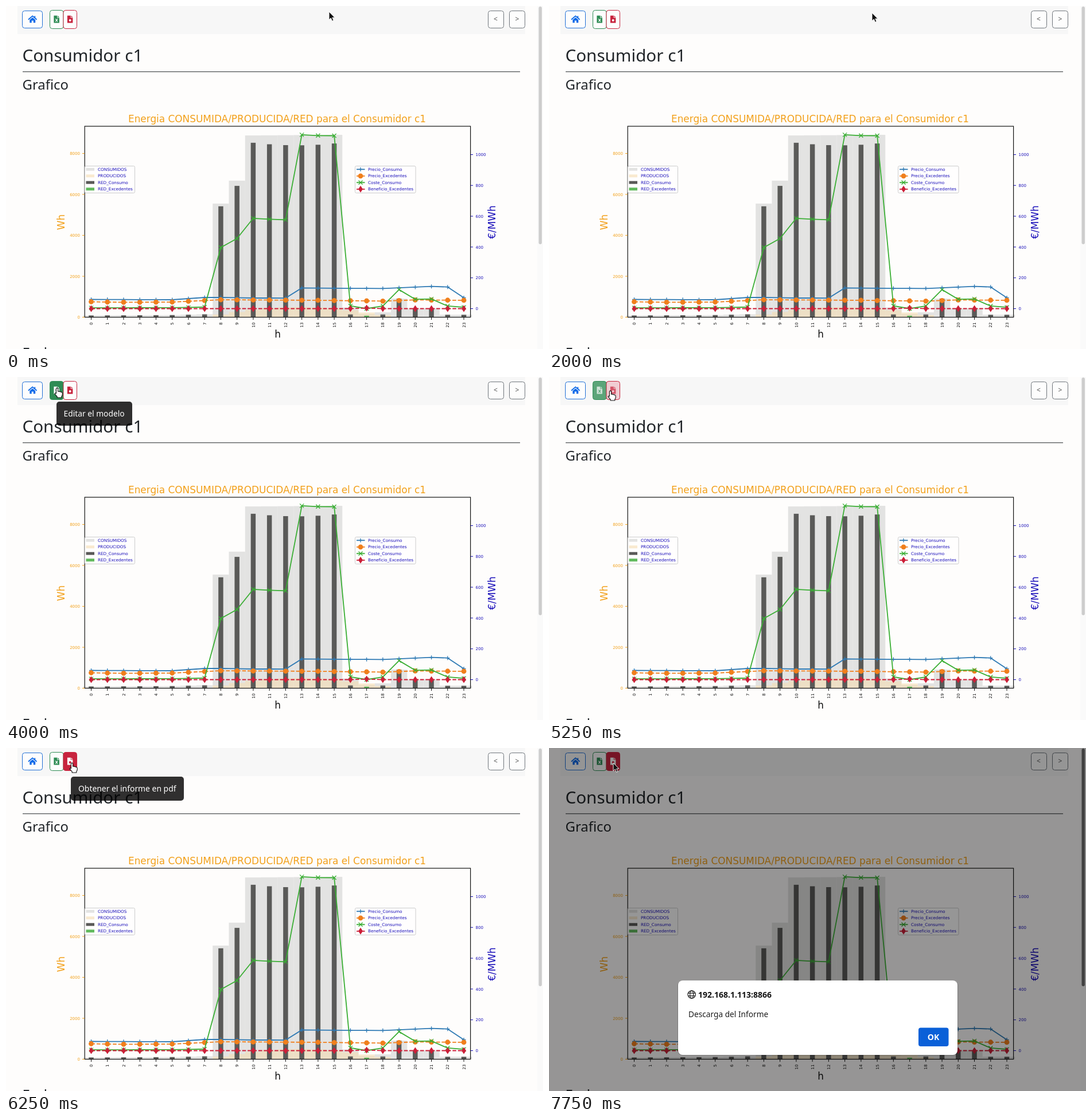
Animation, 936 px wide and 599 px high, one loop 8 s. Source, as an HTML page:

```html
<!DOCTYPE html>
<html lang="es">
<head>
<meta charset="utf-8">
<style>
html, body { margin: 0; width: 100%; height: 100%; overflow: hidden; background: #fefdfc; }
svg { display: block; width: 936px; height: 599px; font-family: "Noto Sans", "Open Sans", sans-serif; }
#chart { font-family: "DejaVu Sans", sans-serif; }
</style>
</head>
<body>
<svg viewBox="0 0 936 599">
  <rect width="936" height="599" fill="#fefdfc"/>
  <rect x="20" width="885" height="49" fill="#f7f7f7"/>
  <rect x="926" width="10" height="599" fill="#fafafa"/>
  <rect id="thumb" x="928.5" y="1" width="5.5" height="415" rx="2.7"/>

  <g fill="#fdfdfd" stroke="#6f757b">
    <rect x="840.5" y="8.5" width="27" height="30" rx="4"/>
    <rect x="877.5" y="8.5" width="27" height="30" rx="4"/>
    <rect x="28.5" y="8.5" width="35" height="30" rx="4" stroke="#1f6fd6"/>
  </g>
  <g font-size="12" fill="#555" text-anchor="middle">
    <text x="853.5" y="27">&lt;</text><text x="891" y="27">&gt;</text>
  </g>
  <path d="M39.5 23.3L46.2 17.4 53 23.3" fill="none" stroke="#0d6ae8" stroke-width="1.8" stroke-linejoin="round" stroke-linecap="round"/>
  <path d="M41.3 24.2L46.2 19.9 51.2 24.2V29.2H47.8V25.6H44.7V29.2H41.3ZM49.3 17.5H51.2V21L49.3 19.4Z" fill="#0d6ae8"/>
  <g id="buttons"></g>

  <g fill="#212529">
    <text x="28.5" y="97" font-size="29.6">Consumidor c1</text>
    <text x="28.5" y="145.5" font-size="23.9">Grafico</text>
    <text x="28.5" y="614" font-size="23.9">Fechas</text>
    <rect x="29" y="114.3" width="867" height="1"/>
  </g>

  <g id="chart"></g>

  <g id="tip1">
    <rect x="88" y="43" width="132" height="42" rx="5" opacity=".81"/>
    <text x="100.5" y="69" font-size="13.8" fill="#fff">Editar el modelo</text>
  </g>
  <g id="tip2">
    <rect x="113" y="50" width="197" height="42" rx="5" opacity=".81"/>
    <text x="126" y="76" font-size="13.9" fill="#fff">Obtener el informe en pdf</text>
  </g>

  <g id="dialog">
    <rect width="936" height="599" opacity=".41"/>
    <rect x="224" y="406" width="489" height="131" rx="9" opacity=".2"/>
    <rect x="225" y="406" width="487" height="130" rx="8" fill="#fff"/>
    <g fill="none" stroke="#1c1c1c" stroke-width="1.2">
      <circle cx="248.7" cy="430.5" r="6.7"/>
      <ellipse cx="248.7" cy="430.5" rx="3" ry="6.7"/>
      <path d="M242.5 428.2H255M242.5 432.8H255"/>
    </g>
    <text x="260" y="435.7" font-size="14" font-weight="700" fill="#111">192.168.1.113:8866</text>
    <text x="243" y="469.8" font-size="13.7" fill="#1c1c1c">Descarga del Informe</text>
    <rect x="644" y="488.5" width="52.5" height="32.5" rx="4" fill="#0a60d8"/>
    <text x="670" y="510" font-size="14" font-weight="700" fill="#fff" text-anchor="middle">OK</text>
  </g>

  <path id="arrow" d="M0 0V14L3.3 11 5.5 16.2 7.9 15.2 5.8 10.2H10Z" fill="#111" stroke="#fff" stroke-width=".9"/>
  <path id="hand" d="M-1.6 1.2Q0 -1 1.6 1.2V6.2Q3.3 5.2 4.4 6.8 6 6 6.9 7.5 8.8 7 9.2 9V12.5L7.8 15V17H.2V15.3L-4 10.4Q-3.8 8.5-1.6 9.8Z" fill="#fff" stroke="#111" stroke-width="1.1" stroke-linejoin="round"/>
</svg>
<script>
const el = id => document.getElementById(id);
const tag = (name, attrs, body = "") =>
  `<${name} ${Object.entries(attrs).map(([k, v]) => `${k}="${v}"`).join(" ")}>${body}</${name}>`;
const text = (x, y, s, size, fill, more = {}) => tag("text", { x, y, "font-size": size, fill, ...more }, s);
const turned = (x, y, s, size, fill, anchor) =>
  text(0, 0, s, size, fill, { "text-anchor": anchor, transform: `translate(${x} ${y}) rotate(-90)` });
const rect = (x, y, width, height, fill, more = {}) => tag("rect", { x, y, width, height, fill, ...more });
const path = (d, stroke, width = 1, more = {}) => tag("path", { d, stroke, "stroke-width": width, fill: "none", ...more });
const clamp = v => Math.max(0, Math.min(1, v));

const ORANGE = "#f2a11c", BLUE = "#1a0fba", STEP = 28.24;
const hours = [...Array(24).keys()];
const hourX = h => 148.5 + h * STEP;
const energyY = wh => 543.5 - wh * .03575;
const priceY = eur => 528.5 - eur * .269;

// Straight lines between a few [hour, value] points
const through = points => h => {
  const i = Math.max(1, points.findIndex(p => p[0] >= h));
  const [[x0, y0], [x1, y1]] = [points[i - 1], points[i]];
  return y0 + (y1 - y0) * (h - x0) / (x1 - x0);
};
const used = through([[0, 85], [5, 105], [7, 140], [8, 5550], [9, 6670], [10, 8880], [15, 8910],
  [16, 475], [17, 155], [18, 240], [19, 910], [20, 435], [21, 435], [22, 120], [23, 120]]);
const made = h => 500 * Math.max(0, Math.sin(Math.PI * clamp((h - 7) / 11.8)));
const bought = h => Math.max(0, used(h) - made(h));
const spare = h => Math.max(0, made(h) - used(h));
const buyPrice = through([[0, 59.5], [5, 57.6], [7, 72.5], [8, 73.2], [10, 68.8], [12, 68.6], [13, 134.4],
  [15, 132.3], [18, 130.9], [21, 144.2], [22, 140.5], [23, 70.6]]);
const sellPrice = through([[0, 44.6], [2, 41], [5, 42.7], [8, 57.6], [14, 54], [18, 49], [20, 56.5], [23, 54]]);

const bars = [
  { name: "CONSUMIDOS", color: "#e3e3e2", width: STEP + .1, value: used },
  { name: "PRODUCIDOS", color: "#f5deb3", width: STEP, value: made, opacity: .6 },
  { name: "RED_Consumo", color: "#5a5a58", width: 8.47, value: bought },
  { name: "RED_Excedentes", color: "#62ba5e", width: 8.47, value: spare }
];
const series = [
  { name: "Precio_Consumo", color: "#2f7ab4", mark: "plus", value: buyPrice },
  { name: "Precio_Excedentes", color: "#f07f1c", mark: "dot", dash: 1, value: sellPrice },
  { name: "Coste_Consumo", color: "#3aae34", mark: "cross", value: h => buyPrice(h) * bought(h) / 1000 },
  { name: "Beneficio_Excedentes", color: "#cc1f38", mark: "diamond", dash: 1, value: h => sellPrice(h) * spare(h) / 1000 }
];
const marks = {
  plus: (x, y, c) => path(`M${x - 3.5} ${y}h7M${x} ${y - 3.5}v7`, c, 1.3),
  cross: (x, y, c) => path(`M${x - 3.5} ${y - 3.5}l7 7m0 -7l-7 7`, c, 1.3),
  dot: (x, y, c) => tag("circle", { cx: x, cy: y, r: 4.4, fill: c }),
  diamond: (x, y, c) => tag("path", { d: `M${x} ${y - 6}l4 6-4 6-4-6Z`, fill: c })
};
const curve = (d, s) => path(d, s.color, 1.8, { "stroke-linejoin": "round", "stroke-dasharray": s.dash ? "6.6 2.8" : "none" });

function buildChart() {
  let out = "";
  for (const { color, width, value, opacity = 1 } of bars)
    for (const h of hours) {
      const y = energyY(value(h));
      out += rect(hourX(h) - width / 2, y, width, energyY(0) - y, color, { opacity });
    }
  for (const s of series) {
    const points = hours.map(h => [hourX(h), priceY(s.value(h))]);
    out += curve("M" + points.join("L"), s);
    for (const [x, y] of points) out += marks[s.mark](x, y, s.color);
  }

  out += rect(137.2, 210, 672.4, 333.5, "none", { stroke: "#111", "stroke-width": 1.2 });
  for (let wh = 0; wh <= 8000; wh += 2000) {
    const y = energyY(wh);
    out += path(`M133 ${y}h4`, ORANGE) + text(129, y + 2.6, wh, 7.03, ORANGE, { "text-anchor": "end" });
  }
  for (let eur = 0; eur <= 1000; eur += 200) {
    const y = priceY(eur);
    out += path(`M810 ${y}h4`, BLUE) + text(818.5, y + 2.6, eur, 7.03, BLUE);
  }
  for (const h of hours)
    out += path(`M${hourX(h)} 544v4`, "#111") + turned(hourX(h) + 2.6, 552.5, h, 7.03, "#111", "end");

  const mid = { "text-anchor": "middle" };
  out += text(472.5, 202.5, "Energia CONSUMIDA/PRODUCIDA/RED para el Consumidor c1", 16.9, ORANGE, mid);
  out += text(473.5, 579, "h", 16.9, "#111", mid);
  out += turned(101.5, 377.5, "Wh", 16.9, ORANGE, "middle") + turned(852.5, 377.5, "€/MWh", 16.9, BLUE, "middle");

  const box = { stroke: "#ccc", rx: 2, "fill-opacity": .8 };
  out += rect(137.5, 279.5, 87, 47, "#fff", box) + rect(608.5, 279.5, 105.5, 47, "#fff", box);
  const rowY = i => 285.3 + i * 11.5;
  bars.forEach(({ name, color, opacity = 1 }, i) =>
    out += rect(139.5, rowY(i) - 2.6, 14.5, 5, color, { opacity }) + text(160, rowY(i) + 2.3, name, 7.25, BLUE));
  series.forEach((s, i) => out += curve(`M611 ${rowY(i)}h14.5`, s) +
    marks[s.mark](618, rowY(i), s.color) + text(631, rowY(i) + 2.3, s.name, 7.25, BLUE));
  el("chart").innerHTML = out;
}

const mix = (a, b, k) => `rgb(${a.map((v, i) => Math.round(v + (b[i] - v) * k))})`;
const PAPER = [253, 253, 253], GREEN = [46, 140, 84], RED = [200, 36, 62];

function fileButton(x, color, hover, ring, symbol) {
  const fill = mix(PAPER, color, hover), ink = mix(color, PAPER, hover), cx = x + 11.7;
  return (ring ? rect(x - 2, 5.5, 27.5, 36, "none", { rx: 6, stroke: "#e58c98", "stroke-width": 3 }) : "") +
    rect(x, 7.5, 23.5, 32, fill, { rx: 4, stroke: `rgb(${color})` }) +
    tag("path", { d: `M${cx - 4.8} 16.8h5.8v3.6h3.7v9.2h-9.5ZM${cx + 1.9} 16.8l2.8 2.8h-2.8Z`, fill: ink }) +
    symbol(cx, fill);
}
const letterX = (x, c) => path(`M${x - 1.9} 22.4l3.8 5m0 -5l-3.8 5`, c, 1.2);
const spot = (x, c) => tag("circle", { cx: x, cy: 25, r: 2, fill: c });

// Pointer stops: time, x, y
const stops = [
  [0, 563, 10], [1000, 563, 11], [2000, 563, 12], [2250, 549, 22], [2500, 345, 54], [2750, 230, 80], [3000, 132, 51],
  [3250, 89, 21], [3500, 89, 19], [5250, 107, 24], [5500, 126, 29], [5750, 115, 26], [7500, 112, 26]
];
const overlays = { tip1: [4000, 5250], tip2: [6250, 7500], dialog: [7750, 8000] };
const TICK = 250, LOOP = 8000, CLICK = 7500;
let shown = -1;

function draw(now) {
  requestAnimationFrame(draw);
  const t = Math.floor(Math.max(0, now - begin) % LOOP / TICK) * TICK;
  if (t === shown) return;
  shown = t;

  const show = (id, on) => el(id).setAttribute("display", on ? "inline" : "none");
  for (const id in overlays) show(id, t >= overlays[id][0] && t < overlays[id][1]);

  const [, x, y] = stops.findLast(s => s[0] <= t);
  const hand = t < CLICK && x > 76 && x < 124 && y < 40;
  show("hand", hand);
  show("arrow", !hand);
  el(hand ? "hand" : "arrow").setAttribute("transform", `translate(${x} ${y})`);
  el("thumb").setAttribute("fill", t >= CLICK ? "#6e6e6e" : "#cdcdcd");

  const hover = (on, off = LOOP) => clamp((t - on) / 250) - clamp((t - off) / 250);
  el("buttons").innerHTML = fileButton(76.5, GREEN, hover(3100, 5195), false, letterX) +
    fileButton(100, RED, hover(5195, 5300) + hover(5575), t === CLICK, spot);
}

buildChart();
const begin = performance.now();
draw(begin);
</script>
</body>
</html>
```
